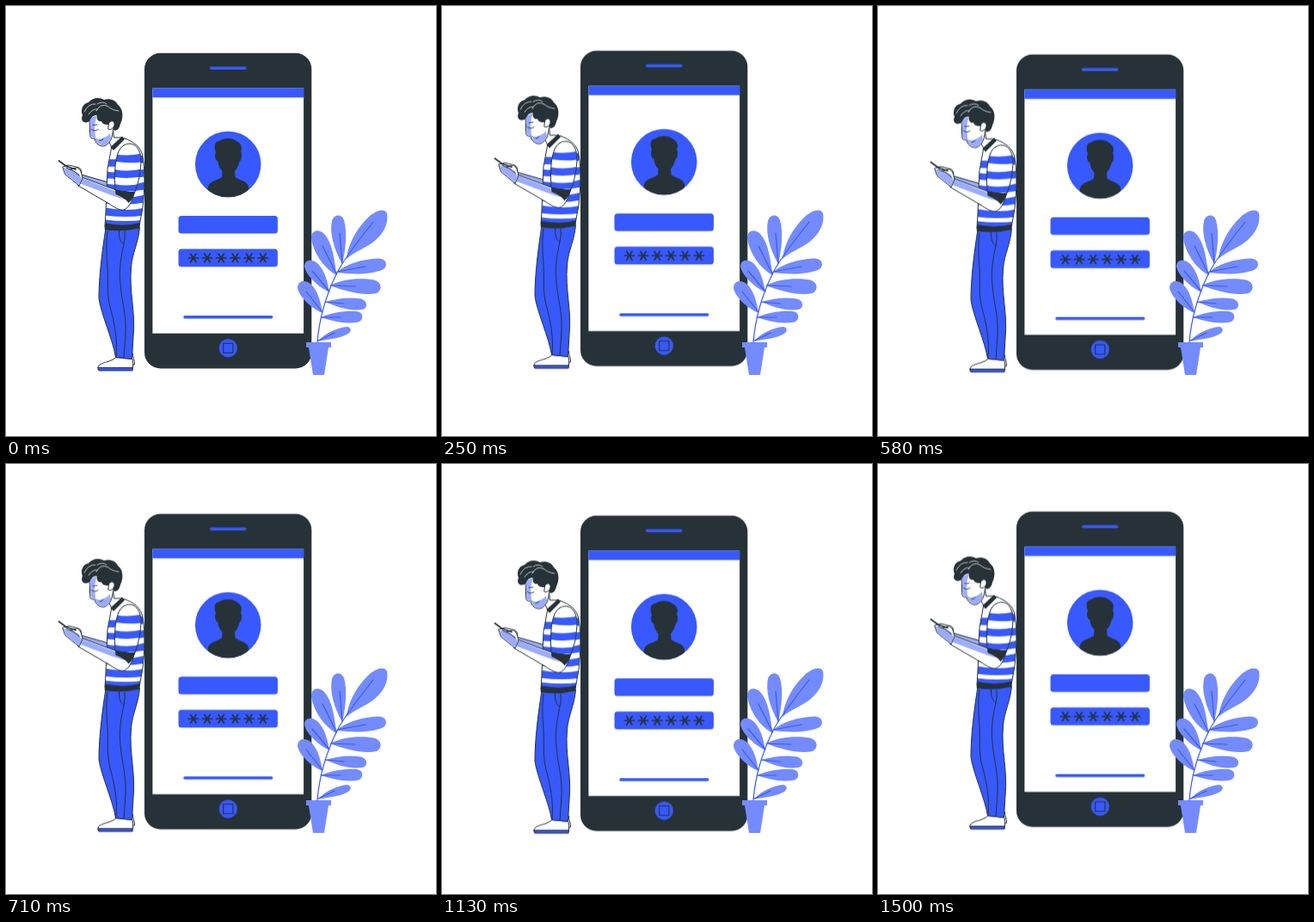
Recreate the animation shown at these times as an HTML page. Size 500 by 500 pixels, loop 1.54 s.

```html
<!DOCTYPE html>
<html lang="en">
<head>
<meta charset="utf-8">
<title>Login</title>
<style>
  html, body { margin: 0; width: 100%; height: 100%; overflow: hidden; background: #fff; }
  svg { display: block; width: 100%; height: 100%; }
  .float { animation: float 1540ms linear infinite; }
  @keyframes float {
    0%, 100% { transform: translateY(0); }
    14.8% { transform: translateY(-3px); }
    64.8% { transform: translateY(7px); }
  }
  .blue { fill: #3759ff; }
  .dark { fill: #263238; }
  .white { fill: #fff; }
  .soft { fill: #9bacff; }
  .leaf { fill: #738bff; }
  .line { fill: none; stroke: #263238; stroke-linecap: round; stroke-linejoin: round; }
  .ink { stroke: #263238; stroke-width: 1; stroke-linejoin: round; stroke-linecap: round; }
  .bar { fill: none; stroke: #3759ff; stroke-width: 3.6; stroke-linecap: round; }
  .vein { fill: none; stroke: #3759ff; stroke-width: 1.2; stroke-linecap: round; }
  .curl { fill: none; stroke: #fff; stroke-width: .7; stroke-linecap: round; }
</style>
</head>
<body>
<svg viewBox="0 0 500 500">
  <defs>
    <clipPath id="disc"><circle cx="258.2" cy="184" r="38.3"/></clipPath>
    <path id="torso" d="M123 164L137 153.500C149 158 157 164 159 175C162 194 161 214 159 234L155 256Q135 260 115 257L116 240L117 214L118 190Z"/>
    <path id="sleeve" d="M137 162C147 156 156 164 157 178C157 192 154 206 149.500 217L127 214C126 199 126 181 131 169Q133 164 137 162Z"/>
    <clipPath id="inTorso"><use href="#torso"/></clipPath>
    <clipPath id="inSleeve"><use href="#sleeve"/></clipPath>
    <path id="star" d="M-5.700 0H5.700M-3.200 -4.800L3.200 4.800M3.200 -4.800L-3.200 4.800"/>
  </defs>

  <g class="float">
    <!-- phone -->
    <rect class="dark" x="161" y="54.800" width="194.300" height="366.600" rx="18.500"/>
    <rect class="white" x="170.400" y="95.600" width="175.700" height="285.100"/>
    <rect class="blue" x="170.400" y="95.600" width="175.700" height="10.800"/>
    <path class="bar" d="M238.700 72.300H277.700"/>
    <circle class="blue" cx="258.200" cy="184" r="38.300"/>
    <path class="dark" clip-path="url(#disc)" d="M244 170C241 163 243 157 248 157C252 153 264 153 268 157C274 160 275 165 273 169C275 174 274 179 271.500 181C270 187 268 190 266 192L266.500 199C272 203 280 203 282 210L284 224H232L235 210C237 203 246 203 251 199L251.500 192C248 189 247 185 246.500 181C243 179 242 174 244 170Z"/>
    <rect class="blue" x="200.500" y="243.900" width="115.400" height="20.700" rx="3.500"/>
    <rect class="blue" x="200.500" y="282.500" width="115.400" height="20.700" rx="3.500"/>
    <g class="line" stroke-width="1.700">
      <use href="#star" x="217.800" y="293"/>
      <use href="#star" x="234" y="293"/>
      <use href="#star" x="250.200" y="293"/>
      <use href="#star" x="266.400" y="293"/>
      <use href="#star" x="282.600" y="293"/>
      <use href="#star" x="298.800" y="293"/>
    </g>
    <path class="bar" d="M208 361.700H308.600"/>
    <circle class="blue" cx="258.300" cy="397.800" r="10.600"/>
    <rect class="line" stroke-width="1.100" x="252.700" y="392.300" width="11.200" height="11"/>

    <!-- shoes -->
    <path class="white ink" d="M144 404H147.500C147 409 150 411 149.500 417H142Z"/>
    <path class="white ink" d="M128 408.500L147 410.500Q148 415 147.500 421H107C107 416 114 415 120 413Q126 411 128 408.500Z"/>
    <path class="blue ink" d="M107 420.700H147.500L147 424H108Q106.500 423 107 420.700Z"/>

    <!-- trousers -->
    <path class="blue ink" d="M116 258L155.500 257C154 276 147 286 145.500 304C143 333 151 356 148 385L146.500 410.500L127.500 408.500C125 390 110 357 108 340C108 314 112 284 116 258Z"/>
    <path class="line" stroke-width="1" d="M118 262C116 276 117 288 118 304C119 324 117 334 121 350C126 368 130 388 128 408M131.500 260C131 269 133 275 137 277C134 291 131 306 133 323C134 341 140 358 139 380Q138 397 137 409M138 262Q139 270 137 277"/>

    <!-- far arm -->
    <path class="soft ink" d="M84 195L119 205V215L84 202Z"/>

    <!-- shirt -->
    <use href="#torso" class="white"/>
    <g class="blue" clip-path="url(#inTorso)">
      <path d="M112 177Q140 181 164 172V181Q140 189 112 186ZM112 192Q140 196 164 189V198Q140 203 112 200ZM112 206Q140 211 164 204V213Q140 218 112 215ZM112 220Q140 226 164 219V228Q140 233 112 229ZM112 234Q140 240 164 234V243Q140 247 112 243ZM112 248Q140 252 164 248V256H112Z"/>
    </g>
    <use href="#torso" class="line" stroke-width="1"/>
    <path class="dark" d="M115 252.500Q137 257 156 252L155 258.500Q136 263 114.700 260Z"/>

    <!-- near arm -->
    <path class="white ink" d="M88 199L128 214L149 217C147 227 142 236 137 237C132 238 126 234 120 230L84 209Z"/>
    <path class="soft" d="M88 200L132 217L139 225Q130 223 120 219L85 206Z"/>
    <use href="#sleeve" class="white"/>
    <g class="blue" clip-path="url(#inSleeve)">
      <path d="M122 171Q140 176 160 171V181Q140 184 122 180ZM122 189Q140 194 160 189V198Q140 202 122 198ZM122 206Q140 211 160 206V214Q140 217 122 213Z"/>
    </g>
    <use href="#sleeve" class="line" stroke-width="1"/>
    <path class="dark" d="M127 213.500Q139 217 150.500 215.500C149 221 146 226 142.500 229C139 224 133 221 127.500 219Z"/>

    <!-- hands and handset -->
    <path class="white ink" d="M66 187L73 185L83 187.500L87 192L89 200L85 209L74 200L69 196Z"/>
    <path class="soft" d="M66.500 188L76 190L85 195L88 201L85 208L74 199L69 195Z"/>
    <path class="line" stroke-width="1" d="M75 190L84 187.500Q88 189 88 194M70 188L79 192L85 197"/>
    <path class="line" stroke-width="1.700" d="M61.500 180L70 186.200L81 190"/>

    <!-- head -->
    <path class="white ink" d="M124 139L125.500 153L136 153L123.500 165Q119 159 118 152Z"/>
    <path class="dark" d="M135 151.500L138 155L125 168L121.500 164Z"/>
    <path class="white ink" d="M97 128L97.500 145L98 152.500Q100 155 103 154C104 160 109 163.500 114 163Q120 161 123 153L126 137L119 125Z"/>
    <path class="soft" d="M97.500 131L106 127Q102 137 103.500 147L104 153Q108 156 113 153.500Q118 152 121 148L122 154Q118 162 113 162.500Q105 161 103 153.500L98.500 152Z"/>
    <path class="line" stroke-width=".9" d="M99.500 143.500Q103 146.500 107 143.500M101 138.500L106 138M109 156.500Q112 157 113 154.500"/>
    <path class="dark" d="M97 134C91 138 86 133 89 127C86 120 90 113 96 112C101 106 109 106 114 109C121 107 128 110 130 115C136 119 137 129 133 137Q132 144 126 145L122 137L118 138Q112 138 111 134C106 135 105 130 106 126Q100 127 97 134Z"/>
    <path class="white ink" d="M120 135.500C124 131 128 136 125 141Q122 145 119 143Z"/>
    <path class="curl" d="M91 123Q96 113 104 114M96 126Q101 119 106 120M105 122Q110 112 119 117Q123 121 131 122M106 114Q112 110 117 114"/>
  </g>

  <!-- plant -->
  <g class="leaf">
    <path d="M396 294C398 275 410 256 422 245C430 238 440 234.500 443 241C445 252 440 263 430 272C420 281 406 285 396 294Z"/>
    <path d="M391 300C381 283 376 263 379 250C381 242 390 241 393 249C397 263 395 283 391 300Z"/>
    <path d="M384.500 313C368 304 357 285 355 270C355 260 364 259 370 265C380 276 382 296 384.500 313Z"/>
    <path d="M376 333C362 326 349 313 347 303C347 294 357 294 363 300C372 310 374 322 376 333Z"/>
    <path d="M368 357C354 351 341 338 339 328C339 319 348 318 354 323C363 331 366 345 368 357Z"/>
    <path d="M384 310C395 300 415 294 433 293.500C443 294 444 302 439 306C425 313 402 312 384 310Z"/>
    <path d="M377 325C392 317 412 316 428 318.500C437 321 438 330 431 334C415 337 395 332 377 325Z"/>
    <path d="M371 344C385 340 400 338 413 340.500C421 343 421 352 414 353C400 355 385 350 371 344Z"/>
    <path d="M366 362C380 356 395 354 408 355C416 356 416 365 410 367.500C395 370 380 367 366 362Z"/>
    <path d="M363 390C371 380 385 374 397 373C402 374 402 379 397 381.500C388 387 375 387 363 390Z"/>
    <path d="M349 391H378V397H375L370 429H357L352 397H349Z"/>
  </g>
  <path class="vein" d="M362 391C364 366 370 341 384 312C390 299 407 276 427 251M391 300L388 264M384.500 312L368 279M376 332L356 308M368 356L349 332M385 309L418 303M377 325L406 326M371 344L393 346M366 362L389 362M363 389L382 380"/>
</svg>
</body>
</html>
```
